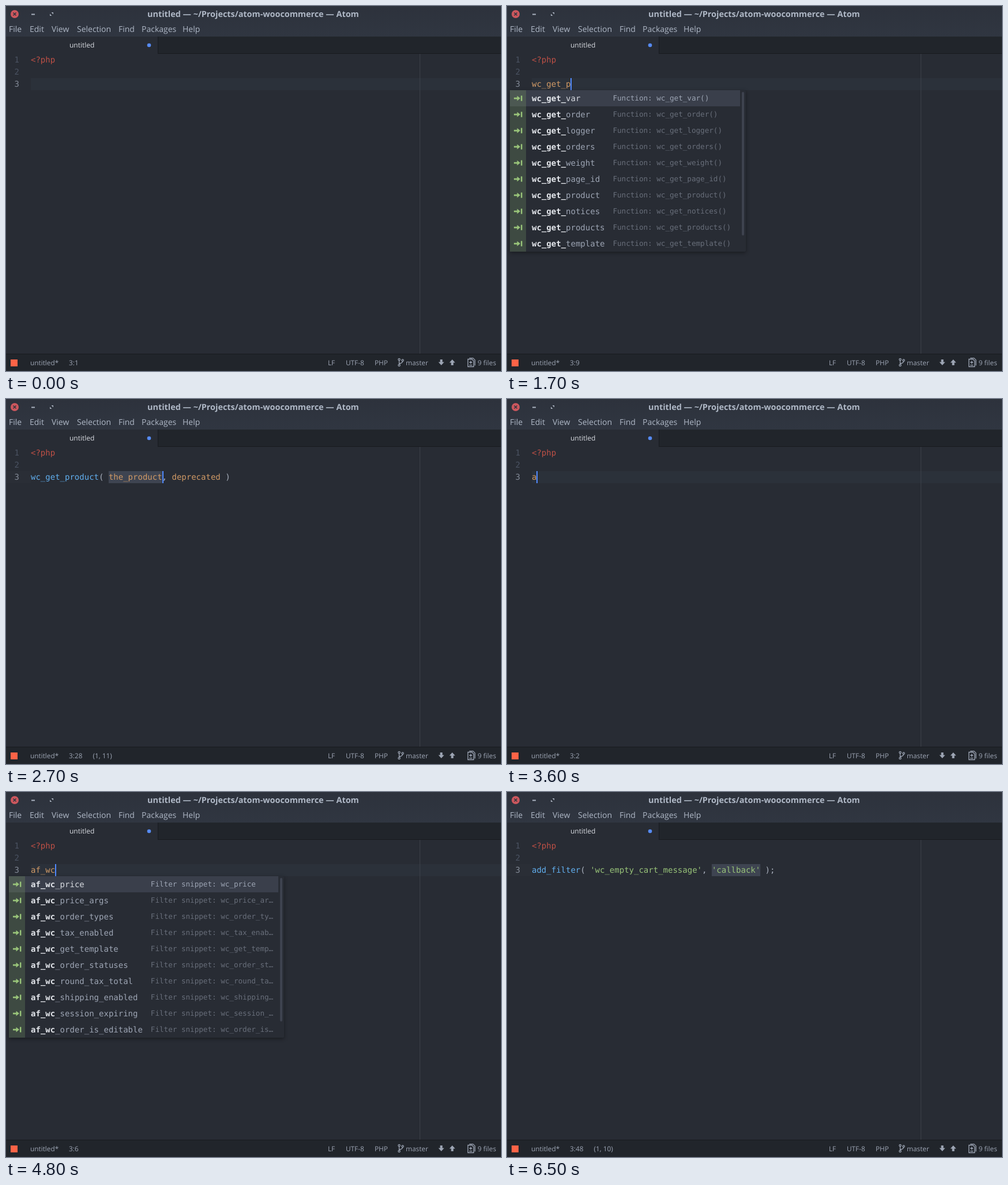
Write an HTML page that moves like this. It is 858 px wide and 633 px high and loops after 6700 ms.

```html
<!DOCTYPE html>
<html lang="en">
<head>
<meta charset="utf-8">
<title>Editor autocomplete</title>
<style>
html, body { margin: 0; width: 100%; height: 100%; overflow: hidden; background: #282c34; }
svg { display: block; width: 858px; height: 633px; }
text { white-space: pre; text-rendering: geometricPrecision; }
.ui { font-family: "Open Sans", "Noto Sans", sans-serif; }
.menu { font-size: 14px; fill: #afb8c6; }
.status { font-size: 11.8px; fill: #9da5b4; }
.code { font: 14px "DejaVu Sans Mono", monospace; }
.label { font: 12.6px "DejaVu Sans Mono", monospace; }
.hit { font-weight: bold; fill: #e4e7ec; }
.popup { filter: drop-shadow(0 2px 3px rgba(0, 0, 0, .4)); }
</style>
</head>
<body>
<svg viewBox="0 0 858 633" xmlns="http://www.w3.org/2000/svg">
  <defs>
    <linearGradient id="bar" x2="0" y2="1">
      <stop stop-color="#2d323c"/><stop offset="1" stop-color="#303641"/>
    </linearGradient>
    <g id="snippet" fill="#98c379">
      <path d="M7 12.7h5.5v-3l5.5 4.4-5.5 4.4v-3H7z"/>
      <rect x="19" y="9.5" width="2.4" height="9.2"/>
    </g>
  </defs>
  <rect width="858" height="633" fill="#282c34"/>
  <rect width="858" height="53" fill="url(#bar)"/>
  <circle cx="15" cy="14" r="7" fill="#cc575d"/>
  <path d="M12.5 11.5l5 5m0-5l-5 5" stroke="#2f343f" stroke-width="1.6"/>
  <path d="M44 14.5h6" stroke="#a9b1be" stroke-width="2"/>
  <path d="M78.5 11h3.5v3.5zM76 13.5v3.5h3.5z" fill="#a9b1be"/>
  <text class="ui" x="245" y="19" font-size="14.4" font-weight="700" fill="#afb8c6">untitled — ~/Projects/atom-woocommerce — Atom</text>
  <g class="ui menu">
    <text x="5" y="45">File</text>
    <text x="41" y="45">Edit</text>
    <text x="79" y="45">View</text>
    <text x="123" y="45">Selection</text>
    <text x="195" y="45">Find</text>
    <text x="235" y="45">Packages</text>
    <text x="306" y="45">Help</text>
  </g>
  <rect x="263" y="53" width="595" height="30" fill="#21252b"/>
  <path d="M263.5 53v29.5H858" fill="none" stroke="#181a1f"/>
  <text class="ui" x="110" y="72" font-size="12" fill="#d7dae0">untitled</text>
  <circle cx="248" cy="68" r="3.3" fill="#568af2"/>
  <g id="line"></g>
  <g class="code" fill="#4b5363">
    <text x="14.5" y="98">1</text>
    <text x="14.5" y="119">2</text>
    <text x="14.5" y="140" fill="#838a97">3</text>
    <text x="43" y="98" fill="#be5046">&lt;?php</text>
  </g>
  <path d="M717.5 83v520" stroke="#3c4049"/>
  <g id="popup"></g>
  <rect y="603" width="858" height="30" fill="#21252b"/>
  <path d="M0 603.5h858" stroke="#181a1f"/>
  <rect x="8" y="613" width="12" height="12" fill="#ff6347"/>
  <g class="ui status">
    <text x="42" y="623">untitled*</text>
    <text id="pos" x="109" y="623"></text>
    <text id="count" x="150.5" y="623"></text>
    <text x="558" y="623">LF</text>
    <text x="589" y="623">UTF-8</text>
    <text x="639" y="623">PHP</text>
    <text x="693" y="623">master</text>
    <text x="817.5" y="623">9 files</text>
  </g>
  <g fill="none" stroke="#9da5b4" stroke-width="1.3">
    <circle cx="681.5" cy="613" r="1.6"/>
    <circle cx="681.5" cy="623" r="1.6"/>
    <circle cx="687.5" cy="614.5" r="1.6"/>
    <path d="M681.5 614.6v6.8M687.5 616q0 3-6 4.5"/>
    <path d="M800.6 612.5h7l3 3v10h-10zM803 610.6h6.5l3.3 3.3v9.5"/>
    <path d="M803 618h5M805.5 615.5v5M803 622.8h5"/>
  </g>
  <g fill="#9da5b4">
    <path d="M752.5 613h4v4.5h3l-5 5.5-5-5.5h3z"/>
    <path d="M771.5 623h4v-4.5h3l-5-5.5-5 5.5h3z"/>
  </g>
</svg>
<script>
const LOOP = 6700, CHAR = 8.428, LEFT = 43;
const $ = id => document.getElementById(id);
const esc = s => s.replace(/&/g, '&amp;').replace(/</g, '&lt;');
const cut = (s, n) => s.length > n ? s.slice(0, n - 1) + '…' : s;
const words = (prefix, s) => s.split(' ').map(w => prefix + w);
const rect = (x, y, w, h, fill, extra = '') =>
  `<rect x="${x}" y="${y}" width="${w}" height="${h}" fill="${fill}" ${extra}/>`;

// Suggestion lists
const first = words('wc_', 'clean print_r get_var help_tip add_notice get_order get_logger get_weight get_account_saved_methods get_orders');
const second = words('wc_', 'clean print_r get_var help_tip get_order add_notice get_logger get_weight get_product_category_id get_orders');
const getters = words('wc_get_', 'var order logger weight orders product notices page_id products cart_url');
const wide = [...getters.slice(0, 9), 'wc_get_account_saved_methods'];
const medium = [...getters.slice(0, 9), 'wc_get_product_category_id'];
const ranked = words('wc_get_', 'var order logger orders weight page_id product notices products template');
const products = words('wc_get_', 'product products page_id price_suffix product_ids page_children product_terms page_permalink product_types template');
const af = ['aa_woocommerce_admin_key_fields', 'aa_woocommerce_admin_field_<value_type>', 'add_feed',
  'aa_woocommerce_admin_order_items_after_fees', 'add_filter', 'af_wc_price', 'admin_footer',
  'admin_footer-', 'apply_filters', 'af_wc_price_args'];
const a = ['add_feed', 'add_filter', 'add_action', 'admin_footer', 'apply_filters', ...af.slice(0, 2), 'af_wc_price', 'admin_footer-', 'af_wc_price_args'];
const filters = words('af_wc_', 'price price_args order_types tax_enabled get_template order_statuses round_tax_total shipping_enabled session_expiring order_is_editable');
const cart = [...filters.slice(0, 9), 'af_wc_empty_cart_message'];
const empty = ['af_wc_empty_cart_message', ...filters.slice(0, 9)];

const call = 'wc_get_product( the_product, deprecated )';
const hook = "add_filter( 'wc_empty_cart_message', 'callback' );";

const typed = (t, code, list, query, dx = 0) => ({ t, code, col: code.length, cursor: true, list, query, dx });
const placed = (t, code, col, sel = null, cursor = true, more = {}) => ({ t, code, col, sel, cursor, ...more });
const select = (t, code, part, cursor, more) => {
  const from = code.lastIndexOf(part), to = from + part.length;
  return placed(t, code, to, [from, to], cursor, more);
};

const steps = [
  placed(0, '', 0, null, false),
  placed(100, '', 0),
  typed(300, 'w', first, 'w'),
  typed(400, 'wc', first, 'w'),
  typed(500, 'wc', second, 'wc'),
  typed(700, 'wc_', second, 'wc_'),
  typed(800, 'wc_g', getters, 'wc_g'),
  typed(1000, 'wc_ge', getters, 'wc_g', 8),
  typed(1100, 'wc_ge', wide, 'wc_ge'),
  typed(1200, 'wc_get', wide, 'wc_ge'),
  typed(1300, 'wc_get', medium, 'wc_get'),
  typed(1500, 'wc_get_', medium, 'wc_get', 8),
  typed(1600, 'wc_get_', ranked, 'wc_get_'),
  typed(1700, 'wc_get_p', ranked, 'wc_get_'),
  typed(1800, 'wc_get_p', products, 'wc_get_p'),
  typed(1900, 'wc_get_pr', products, 'wc_get_p', 8),
  typed(2000, 'wc_get_pr', products, 'wc_get_pr'),
  typed(2100, 'wc_get_pro', products, 'wc_get_pro'),
  select(2300, call, 'deprecated', true, { pos: '3:11', count: '' }),
  select(2400, call, 'deprecated'),
  select(2700, call, 'the_product'),
  placed(2900, call, call.length),
  placed(3100, call, 0, [0, call.length], true, { pos: '3:42', count: '' }),
  placed(3200, call, 0, [0, call.length]),
  placed(3400, '', 0),
  typed(3600, 'a'),
  typed(3700, 'a', a, 'a'),
  typed(3900, 'af', a, 'a'),
  typed(4000, 'af', af, 'a'),
  typed(4100, 'af', af, 'af'),
  typed(4300, 'af_', af, 'af'),
  typed(4400, 'af_', filters, 'af_'),
  typed(4500, 'af_w', filters, 'af_'),
  typed(4600, 'af_w', filters, 'af_w'),
  typed(4700, 'af_wc', filters, 'af_w'),
  typed(4800, 'af_wc', filters, 'af_wc'),
  typed(4900, 'af_wc_', filters, 'af_wc'),
  typed(5000, 'af_wc_', cart, 'af_wc_'),
  typed(5100, 'af_wc_e', cart, 'af_wc_'),
  typed(5200, 'af_wc_e', empty, 'af_wc_e'),
  typed(5300, 'af_wc_em', empty, 'af_wc_em'),
  placed(5500, hook, hook.length, null, true, { pos: '3:9' }),
  select(5600, hook, 'callback', true, { pos: '3:9', count: '' }),
  select(5700, hook, 'callback'),
  select(5900, hook, 'callback', false),
  select(6100, hook, "'callback'", true, { pos: '3:47', count: '(1, 8)' }),
  select(6200, hook, "'callback'", false),
  select(6400, hook, "'callback'", true),
  select(6500, hook, "'callback'", false)
];

function highlight(code) {
  return code.replace(/('[^']*')|(\w+)(?=\()|(\w+)|[^\w']+/g, (s, str, fn, word) => {
    const fill = str ? '#98c379' : fn ? '#61afef' : word ? '#d19a66' : '#abb2bf';
    return `<tspan fill="${fill}">${s}</tspan>`;
  });
}

// A selection moves the line shade from the text to the gutter
function drawLine({ code, col, sel, cursor }) {
  const x = LEFT + col * CHAR;
  const back = sel
    ? rect(0, 125, LEFT, 21, '#2a2e36') + rect(LEFT + sel[0] * CHAR, 125, (sel[1] - sel[0]) * CHAR, 21, '#3e4451')
    : rect(LEFT, 125, 815, 21, '#2b313a');
  return back + `<text class="code" x="${LEFT}" y="140">${highlight(code)}</text>` +
    (cursor ? rect(Math.round(x), 125, 2, 21, '#528bff') : '');
}

// Bold the letters of the query in the order they occur
function mark(word, query) {
  let i = 0;
  return [...word].map(c => c === query[i] ? (i++, `<tspan class="hit">${c}</tspan>`) : esc(c)).join('');
}

function describe(w) {
  if (w.startsWith('aa_')) return 'Action snippet: ' + w.slice(3);
  if (w.startsWith('af_')) return 'Filter snippet: ' + w.slice(3);
  if (w.startsWith('admin')) return 'action: ' + w;
  return (w.startsWith('wc_') ? 'Function: ' : 'function: ') + w + '()';
}

function drawPopup({ list, query, dx }) {
  if (!list) return '';
  const x = 5 + dx, top = 146, row = 28;
  const longest = Math.max(...list.map(w => w.length));
  const labelX = x + 52 + Math.min(longest * CHAR, 302);
  const end = Math.round(labelX + 221);
  const rows = list.map((w, i) => {
    const y = top + i * row, on = i === 0;
    return (on ? rect(x, y, end - x, row, '#3a3f4b') : '') +
      rect(x, y, 28, row, on ? '#4c5852' : '#3e4a42') +
      `<use href="#snippet" x="${x}" y="${y}"/>` +
      `<text class="code" x="${x + 38}" y="${y + 19}" fill="${on ? '#d7dae0' : '#9da5b4'}">${mark(cut(w, 36), query)}</text>` +
      `<text class="label" x="${labelX}" y="${y + 18}" fill="${on ? '#9da5b4' : '#686e7a'}">${esc(cut(describe(w), 28))}</text>`;
  });
  return rect(x, top, end + 10 - x, row * list.length, '#282c34', 'rx="2" class="popup"') + rows.join('') +
    rect(end + 3, 149, 4, 249, '#3e434f', 'rx="2"');
}

let shown;
function draw(time) {
  const step = steps.findLast(s => s.t <= time % LOOP);
  if (step === shown) return;
  shown = step;
  const { col, sel } = step;
  $('line').innerHTML = drawLine(step);
  $('popup').innerHTML = drawPopup(step);
  $('pos').textContent = step.pos ?? `3:${col + 1}`;
  $('count').textContent = step.count ?? (sel ? `(1, ${sel[1] - sel[0]})` : '');
}

const start = performance.now();
function tick() {
  draw(performance.now() - start);
  requestAnimationFrame(tick);
}
tick();
</script>
</body>
</html>
```
